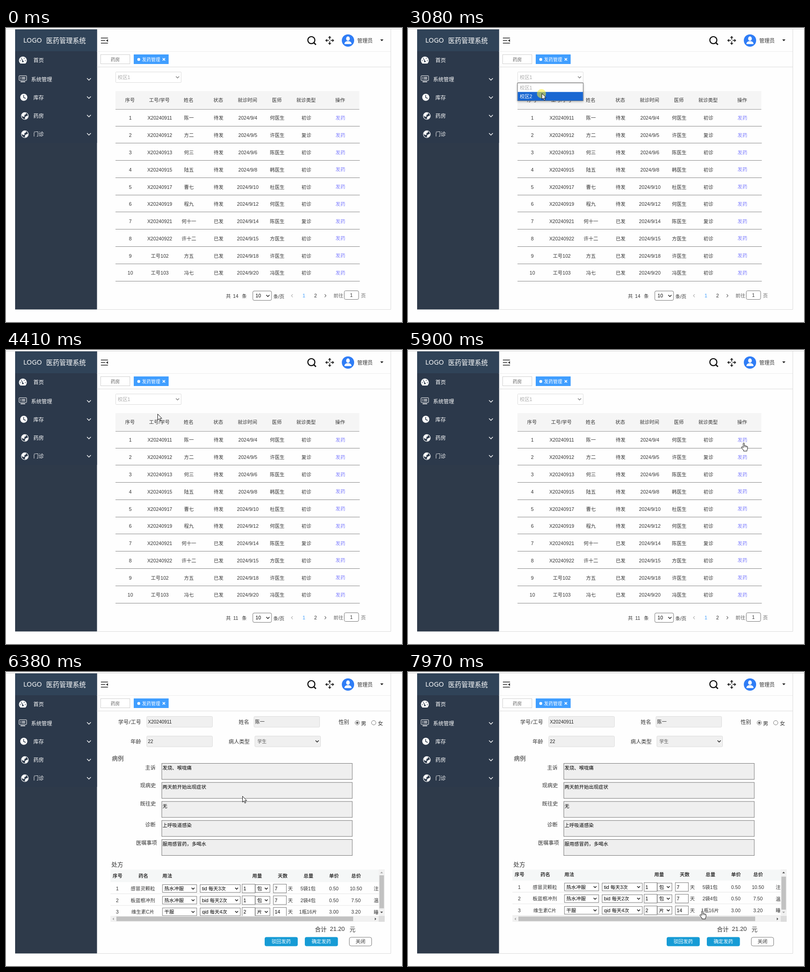
These frames come from a looping animation (868 px wide and 645 px high, 8 s). An HTML page:

```html
<!DOCTYPE html>
<html lang="zh">
<head>
<meta charset="utf-8">
<title>医药管理系统</title>
<style>
html, body { margin: 0; width: 100%; height: 100%; overflow: hidden; background: #fefefe; }
svg { display: block; width: 868px; height: 645px; font-family: 'Liberation Sans', 'Noto Sans CJK SC', 'Noto Sans CJK', sans-serif; }
.ui { font-family: 'Noto Sans', 'Noto Sans CJK SC', 'Noto Sans CJK', sans-serif; }
</style>
</head>
<body>
<svg id="stage" viewBox="0 0 868 645"></svg>
<script>
const LOOP = 8000, TICK = 69, START = 940;

// Drawing helpers: text is placed by its vertical centre.
const text = (x, y, s, { size = 10.67, fill = '#333', at = 'middle', extra = '' } = {}) =>
  `<text x="${x}" y="${(y + size * .37).toFixed(2)}" font-size="${size}" fill="${fill}" text-anchor="${at}" ${extra}>${s}</text>`;
const left = (x, y, s, o = {}) => text(x, y, s, { at: 'start', ...o });
const ui = (x, y, s, o = {}) => left(x, y, s, { size: 11.5, extra: 'class="ui"', ...o });
const box = (x, y, w, h, fill, stroke = 'none', r = 0) =>
  `<rect x="${x}" y="${y}" width="${w}" height="${h}" rx="${r}" fill="${fill}" stroke="${stroke}"/>`;
const line = (d, color, w = 1) => `<path d="${d}" fill="none" stroke="${color}" stroke-width="${w}"/>`;
const shape = (d, fill) => `<path d="${d}" fill="${fill}"/>`;
const dot = (x, y, r, fill, stroke = 'none', w = 1) =>
  `<circle cx="${x}" cy="${y}" r="${r}" fill="${fill}" stroke="${stroke}" stroke-width="${w}"/>`;
const chevron = (x, y, color = '#222', k = 1, w = 1.6) =>
  line(`M${x - 3.5 * k} ${y - 1.8 * k}l${3.5 * k} ${3.5 * k} ${3.5 * k} ${-3.5 * k}`, color, w);
const group = (id, body, attrs = '') => `<g id="${id}" ${attrs}>${body}</g>`;
const select = (x, y, w, s) =>
  box(x, y - 8.5, w, 17, '#fff', '#767676') + left(x + 4, y, s, { fill: '#000' }) + chevron(x + w - 8, y, '#222', .9);
const field = (x, y, w, s) => box(x, y - 9.5, w, 19, '#fff', '#767676') + left(x + 3, y, s, { fill: '#000' });

function globe(y) {
  return dot(41.3, y, 7.6, 'none', '#fff', 1.3) +
    shape(`M35 ${y - 4}q4-5 8-3l1 3-4 2 1 3-3 1-3-2zM43 ${y + 1}l5-2q1 5-5 8l-2-2z`, '#fff');
}

function sidebar() {
  const menu = [[60, 70.5, '首页'], [55, 112.5, '系统管理'], [60, 152.5, '库存'], [60, 193, '药房'], [60, 233, '门诊']];
  return box(20, 3, 179.5, 614.5, '#2e3a4a') + box(20, 51, 179.5, 201, '#2c394b') + box(20, 3, 179.5, 48, '#304358') +
    ui(38, 27, 'LOGO', { size: 14.5, fill: '#fff' }) + ui(88, 27.5, '医药管理系统', { size: 14.5, fill: '#fff' }) +
    menu.map(([x, y, s], i) => ui(x, y, s, { fill: '#fff' }) + (i ? chevron(181.8, y, '#fff', 1.2, 1.4) : '')).join('') +
    shape('M31.5 78a8.7 8.7 0 1 1 11 0z', '#fff') +
    line('M37 73l-2.5-5', '#2c394b', 1.6) + dot(37, 73.5, 1.8, '#2c394b') +
    [[31.5, 71.5], [34, 66.5], [40, 66.5], [42.5, 71.5]].map(([x, y]) => dot(x, y, .9, '#2c394b')).join('') +
    box(28.7, 104.7, 16.4, 10.6, 'none', '#fff', 1) + line('M31.5 108.5h2m1.5 0h7m-10.5 3h2m1.5 0h7', '#fff', 1.3) +
    line('M32 118h10', '#fff', 1.6) +
    dot(39, 152, 7.8, '#fff') + line('M38.7 147v5.5l4.5 2', '#2c394b', 1.5) + globe(193) + globe(233);
}

function header() {
  const arm = a => `<g transform="rotate(${a} 709.5 27.3)">` +
    shape('M709.5 17.5l3.6 4h-7.2z', '#222') + line('M709.5 21v4.3', '#222', 1.8) + '</g>';
  return line('M0 2.5H868', '#d4d4d4') + line('M843.5 3V617.5H199.5', '#dcdcdc') +
    line('M199.5 51.5H843', '#ececec') + line('M199.5 85.5H843', '#dcdcdc') +
    line('M208 22h15.5m-15.5 5.5h9.5m-9.5 5.7h15.5', '#222', 1.5) + shape('M223.5 24.4v6.2l-4.2-3.1z', '#222') +
    dot(669.3, 26.6, 7.7, 'none', '#111', 2.4) + line('M674.8 32.3l4.6 4.4', '#111', 2.8) +
    [0, 90, 180, 270].map(arm).join('') +
    dot(749.6, 27.4, 13.5, '#2f7df6') + `<ellipse cx="749.6" cy="23.4" rx="4" ry="4.8" fill="#fff"/>` +
    shape('M741.8 35.3q0-5 5.2-6.3h5.2q5.200 1.300 5.200 6.300z', '#fff') +
    ui(770, 28, '管理员', { size: 11.3 }) + shape('M820.3 25h7l-3.500 4z', '#222') +
    box(207.5, 58.5, 64, 20, '#fff', '#d0d0d0') + text(239.5, 69, '药房', { size: 10, fill: '#666' }) +
    box(280, 58, 76.5, 21, '#409eff') + dot(291, 69, 3.2, '#fff') +
    left(298, 69, '发药管理', { size: 10, fill: '#fff' }) + line('M343.3 66l5.400 5.400m0-5.400l-5.400 5.400', '#fff', 1.7);
}

const COLS = [272.5, 337, 401, 466, 530, 594.5, 658.5];
const rowLine = i => 215.5 + 37.78 * i;

function rows(data) {
  return data.split('|').map((r, i) => [i + 1, ...r.split(' ')]
    .map((s, c) => text(COLS[c], 197.5 + 37.78 * i, s)).join('')).join('');
}

const campus1 = 'X20240911 陈一 待发 2024/9/4 何医生 初诊|X20240912 方二 待发 2024/9/5 许医生 复诊|' +
  'X20240913 何三 待发 2024/9/6 陈医生 初诊|X20240915 陆五 待发 2024/9/8 韩医生 初诊|' +
  'X20240917 曹七 待发 2024/9/10 杜医生 初诊|X20240919 程九 待发 2024/9/12 何医生 初诊|' +
  'X20240921 何十一 已发 2024/9/14 陈医生 复诊|X20240922 许十二 已发 2024/9/15 方医生 初诊|' +
  '工号102 方五 已发 2024/9/18 许医生 初诊|工号103 冯七 已发 2024/9/20 冯医生 初诊';
const campus2 = 'X20240914 许四 待发 2024/9/7 方医生 复诊|X20240916 冯六 待发 2024/9/9 冯医生 初诊|' +
  'X20240918 韩八 待发 2024/9/11 许医生 初诊|X20240920 杜十 待发 2024/9/13 何医生 复诊|' +
  'X20240923 陈三 待发 2024/9/15 韩医生 初诊|X20240924 陆四 待发 2024/9/16 杜医生 初诊|' +
  'X20240925 曹五 已发 2024/9/17 陈医生 初诊|X20240926 程六 已发 2024/9/18 方医生 复诊|' +
  '工号101 方四 已发 2024/9/19 许医生 初诊|工号104 冯八 已发 2024/9/21 冯医生 复诊';

function listPage() {
  const heads = ['序号', '工号/学号', '姓名', '状态', '就诊时间', '医师', '就诊类型'];
  let s = box(240.5, 96.5, 143.5, 23, '#fff', '#dcdcdc', 1) +
    left(245, 108, '校区1', { fill: '#aaa', extra: 'id="campus"' }) + chevron(376, 108, '#888') +
    box(240, 138.5, 534.5, 40, '#f5f5f5') + line('M240 178.5h534.5', '#999') +
    heads.map((h, i) => text(COLS[i] - .8, 158.5, h)).join('') + text(732.5, 158.5, '操作');
  for (let i = 0; i < 10; i++)
    s += line(`M240 ${Math.round(rowLine(i)) - .5}h535.500`, '#888') +
      text(733, 197 + 37.78 * i, '发药', { fill: '#8080ff' });
  return s + group('rows1', rows(campus1)) + group('rows2', rows(campus2)) +
    left(482, 588, '共') + text(503.500, 588, '14', { extra: 'id="total"' }) + left(517, 588.500, '条') +
    box(541, 577, 41, 20.500, '#fff', '#767676', 3) + left(547, 587.500, '10', { fill: '#000' }) + chevron(574, 587.500) +
    left(586, 589, '条/页') + line('M628.500 584l-3 3.300 3 3.300', '#aaa', 1.1) +
    text(653, 587.500, '1', { fill: '#409eff' }) + text(678.500, 587.500, '2') + line('M698.500 584l3 3.300-3 3.300', '#555', 1.1) +
    left(718, 587, '前往', { fill: '#666' }) + box(741.500, 576.500, 31.500, 19, '#fff', '#767676', 3) +
    text(757, 586.500, '1') + left(778, 587, '页', { fill: '#666' });
}

function menuItem(i) {
  const y = 121 + i * 19.300;
  return group('item' + i, box(240.500, y, 143, 19, '#1967d2') + left(245, y + 9.700, '校区' + (i + 1)));
}

function formPage() {
  const input = (x, y, s) => box(x + .500, y + .500, 144, 23.500, '#f0f0f0', '#dcdcdc', 2) +
    left(x + 3, y + 12, s, { size: 10.4, fill: '#222' });
  const notes = [[305, '主诉', '发烧、喉咙痛', 209.500], [294, '现病史', '两天前开始出现症状', 248.500], [294, '既往史', '无', 288.500],
    [305, '诊断', '上呼吸道感染', 335], [285, '医嘱事项', '服用感冒药，多喝水', 374.500]];
  const drugs = [['感冒灵颗粒', '热水冲服', 'tid 每天3次', '1', '包', '7', '5袋1包', '0.50', '10.50', '注'],
    ['板蓝根冲剂', '热水冲服', 'bid 每天2次', '1', '包', '7', '2袋4包', '0.50', '7.50', '温'],
    ['维生素C片', '干服', 'qid 每天4次', '2', '片', '14', '1瓶16片', '3.00', '3.20', '睡']];
  const heads = [[244.500, '序号'], [301, '药名'], [353.500, '用法'], [550.500, '用量'], [606.500, '天数'], [663, '总量'], [719, '单价'], [767.500, '总价']];
  const drugRow = ([name, use, freq, n, unit, days, sum, price, cost, note], i) => {
    const y = 475 + 25.600 * i;
    return text(244, y, i + 1) + text(300, y, name) + select(343, y, 75, use) + select(425.500, y, 88, freq) +
      field(517.500, y, 28.500, n) + select(546.500, y, 32, unit) + field(586, y, 28.500, days) + left(618, y, '天') +
      text(662, y, sum) + text(718.500, y, price) + text(767, y, cost) + left(806, y + .500, note) +
      line(`M229 ${y + 11.500}h588`, '#e6e6e6');
  };
  const button = (x, s) => box(x, 581.500, 72.500, 20, '#169bd5', 'none', 4) + text(x + 36.200, 591.500, s, { fill: '#fff' });
  return ui(246, 109.500, '学号/工号') + input(308, 97, 'X20240911') + ui(510, 109.500, '姓名') + input(543, 97, '陈一') +
    ui(729, 109.500, '性别') + dot(770, 111.300, 4.800, '#fff', '#767676') + dot(770, 111.300, 2.600, '#666') + ui(778, 112.500, '男') +
    dot(806, 111.300, 4.800, '#fff', '#767676') + ui(815, 112.500, '女') +
    ui(273, 152.500, '年龄') + input(308, 140, '22') + ui(488, 152.500, '病人类型') + input(545, 140, '') +
    left(551, 152.500, '学生', { size: 10, fill: '#555' }) + chevron(682, 152) +
    ui(232, 189, '病例', { size: 13 }) +
    notes.map(([x, label, s, y], i) => ui(x, y, label) +
      box(341.500, 200.500 + 41.750 * i, 417.500, 35, '#efefef', '#767676') +
      left(343, 210.500 + 41.750 * i, s, { fill: '#000' })).join('') +
    ui(231, 422.500, '处方', { size: 13 }) +
    `<g clip-path="url(#pane)">` + group('table', box(229, 433, 588, 28, '#f5f7f7') +
      heads.map(([x, s]) => text(x, 447.500, s, { extra: 'font-weight="bold"' })).join('') + drugs.map(drugRow).join('')) + '</g>' +
    box(817, 433, 13, 102, '#f1f1f1') + box(229, 535, 588, 13, '#f1f1f1') + box(817, 535, 13, 13, '#dcdcdc') +
    box(818.500, 446, 10, 72.500, '#c1c1c1').replace('<rect', '<rect id="thumb"') + box(242, 536.500, 519, 10, '#c1c1c1') +
    `<path id="up" d="M820.300 441.500h6l-3-3.200z"/><path id="down" d="M820.300 525.700h6l-3 3.200z"/>` +
    shape('M236.500 538.700v6l-3-3z', '#a3a3a3') + shape('M808.500 538.700v6l3-3z', '#444') +
    ui(677, 564.500, '合计', { size: 13 }) + left(710, 563.500, '21.20', { size: 13 }) + ui(753, 564.500, '元', { size: 13 }) +
    button(567, '驳回发药') + button(655, '确定发药') + box(752.500, 582, 49, 19, '#fff', '#777', 4) + text(777, 591.500, '关闭');
}

const arrow = '<path id="arrow" d="M.500.500V13.500L3.500 10.800 5.600 15.700 7.700 14.800 5.600 10.100H9.700Z" fill="#fff" stroke="#111"/>';
const hand = `<g id="hand"><path d="M-1.300 1.700Q0-.300 1.300 1.700V7Q3.200 5.800 3.900 7.500 5.600 6.700 6.200 8.300 8.200 7.700 8.300 9.800V13Q8.200 15 7 16.500V18.800H-.500V17L-4.500 12Q-6 9.500-4 9.300-2.600 9.500-1.300 11.300Z" fill="#fff" stroke="#111"/>` +
  line('M1.300 7v3.500M3.900 7.500v3M6.200 8.300v2.500', '#111', .8) + '</g>';

const stage = document.getElementById('stage');
stage.innerHTML = '<defs><clipPath id="pane"><rect x="229" y="433.500" width="588" height="101.500"/></clipPath></defs>' +
  box(0, 0, 868, 645, '#fefefe') + sidebar() + header() + group('list', listPage()) + group('form', formPage()) +
  group('menu', box(240, 120.500, 144, 39, '#fff', '#666') + menuItem(0) + menuItem(1),
    'style="filter:drop-shadow(0 2px 2px #0004)"') +
  group('cursor', dot(-.500, 1, 10, 'rgba(255,240,40,.55)').replace('<circle', '<circle id="halo"') + arrow + hand);

const $ = id => document.getElementById(id);
const show = (id, on) => $(id).style.display = on ? '' : 'none';
const within = (t, ...spans) => spans.some(([a, b]) => t >= a && t < b);

// Pointer way points: time, x, y.
const PATH = [[940, 791, 616], [1080, 660, 500], [1220, 410, 320], [1360, 215, 205], [1430, 196, 190], [1485, 199, 187],
  [1515, 199, 187], [1640, 310, 140], [1710, 372, 125], [1990, 366, 108], [2540, 368, 103], [2670, 362, 107], [2880, 293, 143],
  [3210, 293, 143], [3420, 325, 118], [3600, 340, 106], [3840, 340, 106], [3910, 338, 115], [4050, 332, 128],
  [4270, 332, 130], [4380, 332, 140], [4415, 332, 140], [4550, 569, 151], [4750, 569, 151], [5030, 690, 184],
  [5310, 736, 203], [5960, 736, 203], [6110, 680, 218], [6250, 585, 250], [6380, 518, 272], [6400, 518, 272],
  [6520, 507, 289], [6660, 507, 296], [7050, 507, 296], [7260, 560, 360], [7400, 620, 440], [7540, 650, 490],
  [7700, 655, 512], [7900, 652, 514], [7970, 645, 523]];

function pointer(t) {
  const i = PATH.findIndex(p => p[0] > t);
  if (i < 1) return PATH[i ? PATH.length - 1 : 0].slice(1);
  const [a, x, y] = PATH[i - 1], [b, u, v] = PATH[i], k = (t - a) / (b - a);
  return [x + (u - x) * k, y + (v - y) * k];
}

function draw(t) {
  const form = t >= 5965, second = within(t, [3210, 4340]);
  show('list', !form);
  show('form', form);
  show('rows1', !second);
  show('rows2', second);
  $('campus').textContent = second ? '校区2' : '校区1';
  $('total').textContent = t < 3210 ? '14' : '11';

  show('menu', within(t, [2400, 3210], [3840, 4340]));
  const active = within(t, [2810, 3980]) ? 1 : 0;
  [0, 1].forEach(i => {
    const [bar, label] = $('item' + i).children;
    bar.setAttribute('fill', i === active ? '#1967d2' : 'none');
    label.setAttribute('fill', i === active ? '#fff' : '#aaa');
  });

  const scroll = 3.4 * Math.min(1, Math.max(0, (t - 7680) / 80));
  $('table').setAttribute('transform', `translate(0 ${-scroll})`);
  $('thumb').setAttribute('y', 446 + scroll * .85);
  $('up').setAttribute('fill', scroll ? '#444' : '#a3a3a3');
  $('down').setAttribute('fill', scroll > 3 ? '#a3a3a3' : '#444');

  const tick = START + Math.floor((t - START + 15) / TICK) * TICK;
  const [x, y] = pointer(tick).map(Math.round);
  const link = !form && x > 720 && x < 747 && y > 186 && y < 215;
  const grab = x < 204 || link || (form && y > 500);
  show('cursor', t >= START);
  show('hand', grab);
  show('arrow', !grab);
  show('halo', within(t, [2330, 2470], [3080, 3210], [3770, 3900], [4270, 4340], [5770, 5895]));
  $('cursor').setAttribute('transform', `translate(${x} ${y})`);
}

let origin;
function frame(now) {
  origin ??= now;
  draw((now - origin) % LOOP);
  requestAnimationFrame(frame);
}
draw(0);
requestAnimationFrame(frame);
</script>
</body>
</html>
```
